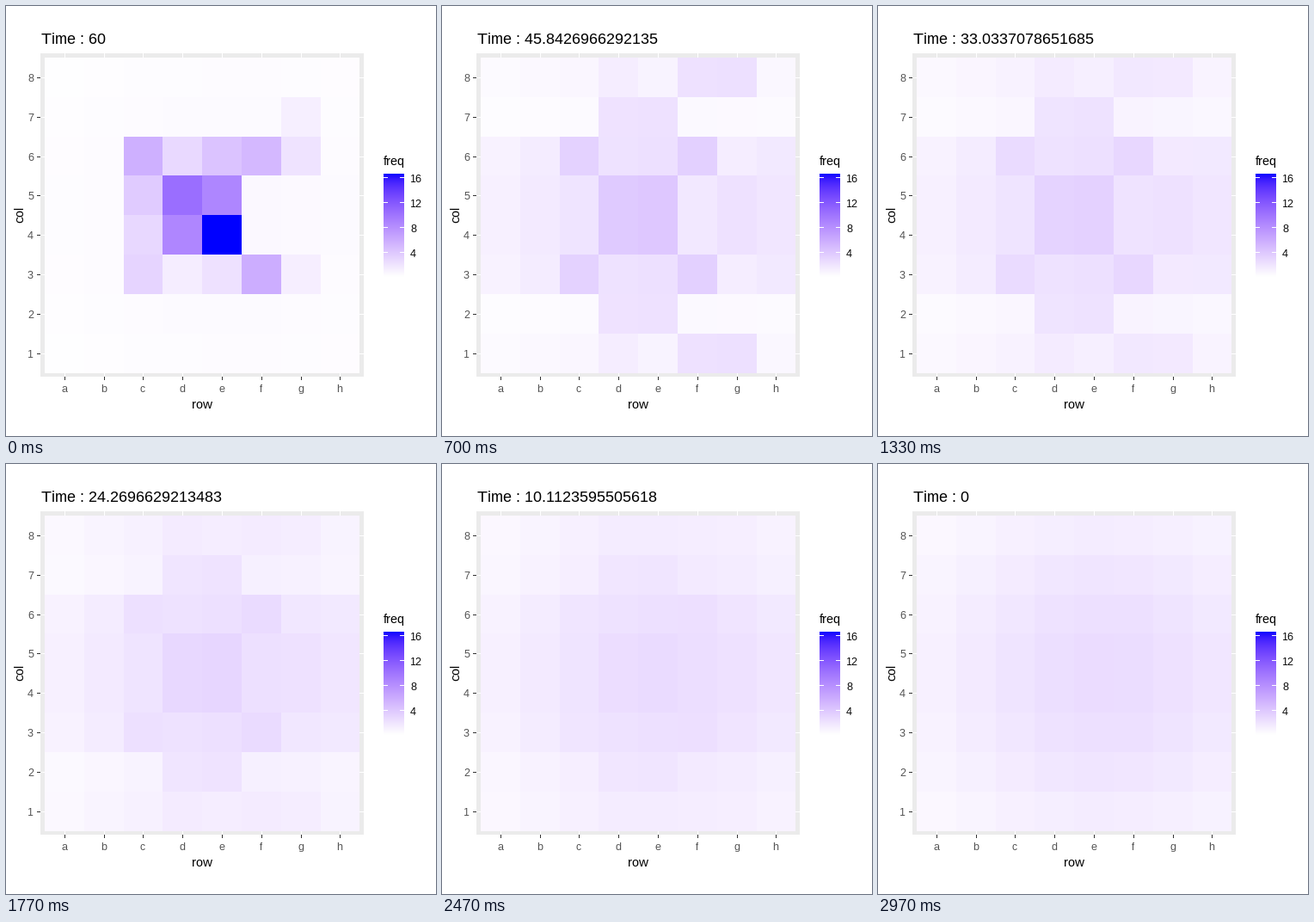
A matplotlib script for the animation above (5 s loop, 500 by 500 pixels).

```python
import matplotlib.pyplot as plt
import numpy as np
from matplotlib.animation import FuncAnimation
from matplotlib.colors import ListedColormap
from matplotlib.patches import Rectangle

plt.rcParams.update({
    "font.family": "Liberation Sans",
    "text.hinting": "native",
    "text.hinting_factor": 1,
})

SIZE, DPI = 500, 100
STEPS = 89              # the title counts from 60 to 0 in this many steps
START, EARLY = 60, 52.6
TOP = 16.6              # upper end of the colour scale
TICK_MS, LOOP_MS = 10, 5000
FILES = "abcdefgh"


def lab_ramp(n=1024):
    """White to blue, blended in CIE Lab."""
    t = np.linspace(0, 1, n)
    L, a, b = 100 - 67.7 * t, 79.19 * t, -107.86 * t
    fy = (L + 16) / 116
    f = np.stack([fy + a / 500, fy, fy - b / 200])
    xyz = np.where(f > 6 / 29, f ** 3, 3 * (6 / 29) ** 2 * (f - 4 / 29))
    xyz = xyz * np.array([[0.95047], [1.0], [1.08883]])
    to_rgb = np.array([[3.2406, -1.5372, -0.4986],
                       [-0.9689, 1.8758, 0.0415],
                       [0.0557, -0.2040, 1.0570]])
    lin = np.clip(to_rgb @ xyz, 0, 1)
    rgb = np.where(lin > 0.0031308, 1.055 * lin ** (1 / 2.4) - 0.055, 12.92 * lin)
    return ListedColormap(np.clip(rgb, 0, 1).T)


def spots(mirror=False, **heights):
    """Board (rank 8 first) with a height on each named square."""
    board = np.zeros((8, 8))
    for square, h in heights.items():
        board[8 - int(square[1]), FILES.index(square[0])] = h
    return board + board[::-1] if mirror else board


# Late game: one broad hill, a little right of the centre
col, row = np.meshgrid(np.arange(8), np.arange(8) - 3.5)
hill = 2.5 * np.exp(-((col - 4.3) / 4.6) ** 2 - (row / 4.4) ** 2)

# First moves: central pawns and knights over a faint hill
opening = 0.2 * hill + spots(
    e4=16.1, d5=10, e5=8.2, d4=8.2, f3=5.4, c6=5.3, f6=4.6, e6=3.8,
    c5=3.3, c3=2.7, c4=2.4, d6=2.3, e3=1.7, g6=1.6, d3=0.9, g7=0.8, g3=0.8)

# Early excess over the hill, the same for both sides
pieces = spots(True, c6=1.9, f6=1.5, d5=1.9, e5=1.9, f5=-1.0, g6=-0.9)
queens = spots(True, d8=0.6, d7=0.4, e7=0.4)
castling = spots(True, f8=2.0, g8=2.2) - 0.55 * hill * (abs(row) == 3.5)
pawn_rank = hill * (abs(row) == 2.5) * (abs(col - 3.5) > 1)


def settled(time):
    k = time / EARLY
    return (hill + pieces * k ** 1.8 + queens * k + castling * k ** 3
            - 0.85 * pawn_rank * k)


def shares(time):
    if time <= EARLY:
        return settled(time)
    u = (START - time) / (START - EARLY)
    return opening + (settled(EARLY) - opening) * (1 - (1 - u) ** 2)


fig = plt.figure(figsize=(SIZE / DPI, SIZE / DPI), dpi=DPI, facecolor="white")
ax = fig.add_axes([0, 0, 1, 1])
ax.axis("off")
cmap = lab_ramp()


def box(x, y, w, h, color, z=1):
    ax.add_patch(Rectangle((x, y), w, h, facecolor=color, linewidth=0,
                           antialiased=False, zorder=z))


def label(x, y, text, px, color="black", **kw):
    return ax.text(x, y, text, fontsize=px * 72 / DPI, color=color,
                   va="baseline", zorder=5, **kw)


# Panel, grid, axis ticks and labels
xs = np.floor(45.6 + 45.78 * np.arange(9))
ys = np.floor(60.4 + 45.84 * np.arange(9))
box(40, 55, 376, 376, "#EBEBEB")
for i in range(8):
    cx = int(68.4 + 45.78 * i)
    cy = int(83.4 + 45.85 * i)
    box(cx, 55, 1, 376, "white", 2)
    box(40, cy, 376, 1, "white", 2)
    box(cx, 431, 1, 4, "#333333")
    box(36, cy, 4, 1, "#333333")
    label(cx - 0.5, 449, FILES[i], 12, "#4D4D4D", ha="center")
    label(32, cy + 5, str(8 - i), 12, "#4D4D4D", ha="right")

label(228, 468, "row", 15, ha="center")
label(20, 242, "col", 15, ha="center", rotation=90, rotation_mode="anchor")

# Colour bar
label(439, 185, "freq", 15)
ax.imshow(np.linspace(TOP, 0, 120)[:, None], cmap=cmap, vmin=0, vmax=TOP,
          extent=(439, 463, 315, 195), aspect="auto",
          interpolation="nearest", zorder=1)
for v in (4, 8, 12, 16):
    y = round(195 + 120 * (1 - v / TOP))
    box(439, y, 5, 1, "white", 3)
    box(458, y, 5, 1, "white", 3)
    label(470, y + 6, str(v), 12)

mesh = ax.pcolormesh(xs, ys, opening, cmap=cmap, vmin=0, vmax=TOP,
                     antialiased=False, linewidth=0, zorder=3)
title = label(41, 44, "", 18)
ax.set_xlim(0, SIZE)
ax.set_ylim(SIZE, 0)


def update(i):
    step = min(STEPS, (i * TICK_MS + 5) * 3 // 100)
    time = (STEPS - step) * START / STEPS
    mesh.set_array(shares(time))
    title.set_text(f"Time : {time:.15g}")
    return mesh, title


anim = FuncAnimation(fig, update, frames=LOOP_MS // TICK_MS, interval=TICK_MS,
                     init_func=lambda: update(0), repeat=True, repeat_delay=0)
plt.show()
```
